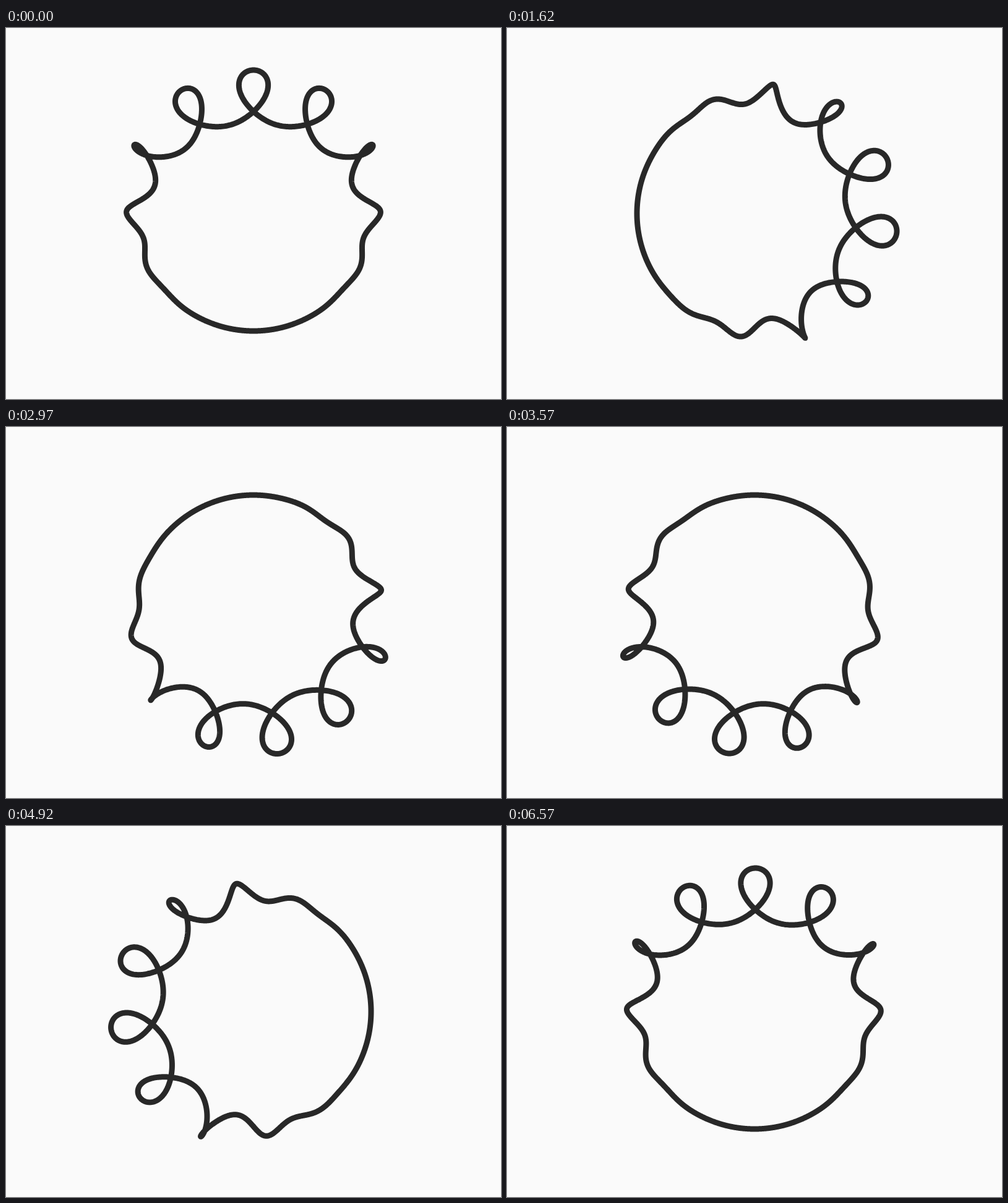
These frames come from a looping animation (800x600 px, 6600 ms). An HTML page with a canvas:

```html
<!DOCTYPE html>
<html lang="en">
<head>
<meta charset="utf-8">
<title>Looping ring</title>
<style>
  html, body { margin: 0; width: 100%; height: 100%; overflow: hidden; background: #fafafa; }
  canvas { display: block; }
</style>
</head>
<body>
<canvas id="stage" width="800" height="600"></canvas>
<script>
const LOOP = 6600, STEP = 30, TAU = Math.PI * 2;
const RADIUS = 190, WAVES = 12, LIFT = 42, SWING = 0.23, POINTS = 1800;
const ctx = document.getElementById("stage").getContext("2d");

const smooth = x => x * x * (3 - 2 * x);

function draw(progress) {
  const focus = progress * TAU;            // strongest coils travel clockwise
  const crest = -progress * TAU / 4;       // the wave itself drifts back
  ctx.fillStyle = "#fafafa";
  ctx.fillRect(0, 0, 800, 600);
  ctx.beginPath();
  for (let i = 0; i < POINTS; i++) {
    const angle = i / POINTS * TAU;
    const near = (1 + Math.cos(angle - focus)) / 2;   // 1 at the focus, 0 opposite
    const phase = WAVES * (angle - crest);
    const r = RADIUS + LIFT * smooth(near ** 1.3) * Math.cos(phase);
    const a = angle - SWING * smooth(near ** 2.4) * Math.sin(phase);
    ctx.lineTo(400 + r * Math.sin(a), 300 - r * Math.cos(a));
  }
  ctx.closePath();
  ctx.strokeStyle = "#282828";
  ctx.lineWidth = 9;
  ctx.lineJoin = "round";
  ctx.stroke();
}

const start = performance.now();
function tick() {
  const time = (performance.now() - start) % LOOP;
  draw(Math.floor(time / STEP) * STEP / LOOP);
  requestAnimationFrame(tick);
}
tick();
</script>
</body>
</html>
```
